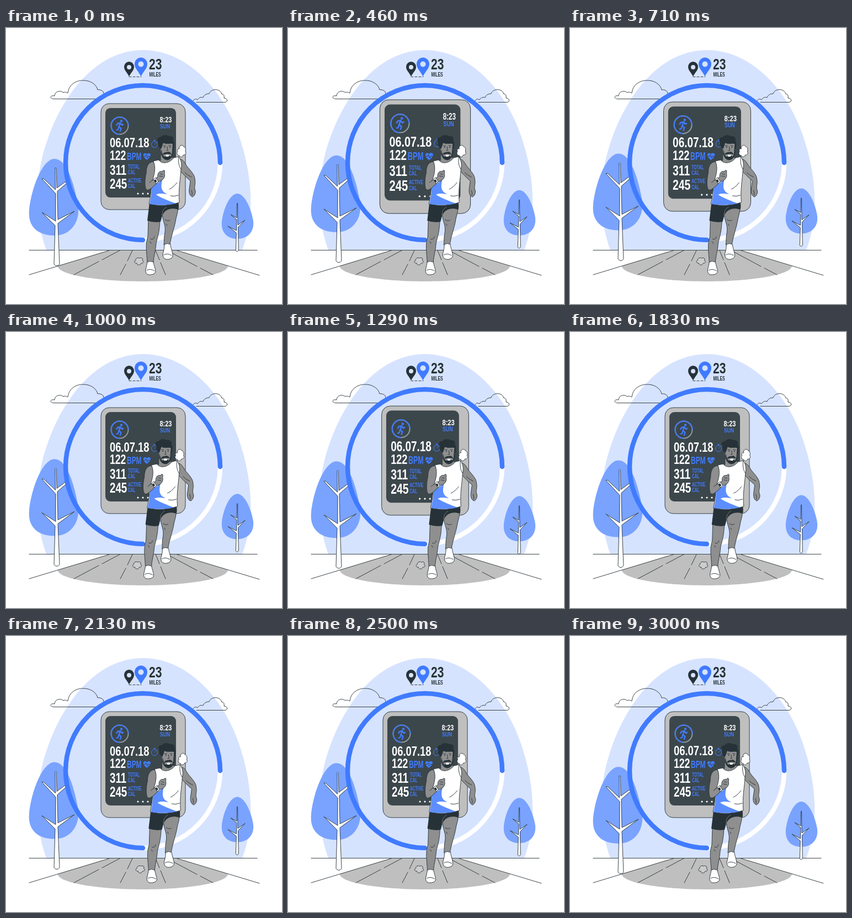
Animation of 500x500 px, one loop 3040 ms. Source, as an HTML page:

```html
<!DOCTYPE html>
<html lang="en">
<head>
<meta charset="utf-8">
<title>Running tracker</title>
<style>
  html, body { margin: 0; width: 100%; height: 100%; overflow: hidden; background: #fff; }
  svg { display: block; width: 100%; height: 100%; }
  text { font: bold 10px "Liberation Sans", Arial, sans-serif; }
  .line { fill: none; stroke: #263238; stroke-width: .9; stroke-linecap: round; stroke-linejoin: round; }
  .ink { stroke: #263238; stroke-width: .9; stroke-linejoin: round; }
  .dark { fill: #263238; }
  .blue { fill: #407bff; }
  .white { fill: #fff; }
  .skin { fill: #8f8f8f; }
  .grey { fill: #bfbfbf; }
  .leaf { fill: #79a3ff; }
  .pale { fill: #d6e3ff; }
</style>
</head>
<body>
<svg viewBox="0 0 500 500">
  <path class="pale" d="M73 402C50 340 52 265 76 200C105 118 165 40 248 40C330 40 395 115 422 195C446 265 452 340 428 402Z"/>

  <!-- clouds -->
  <path class="line" d="M165 128.5H87C79 129 79 121 88 123C88 115 98 112 104 117C107 115 110 117 112 118C114 100 130 95 138 95C152 94 164 102 166 112C173 111 178 115 177 121"/>
  <path class="line" d="M345 134.5H397C403 133 401 127 395 127C396 121 393 119 391 120C389 109 371 109 368 119C360 119 358 124 357 126C352 124 348 128 347 130C342 127 340 130 339 132"/>

  <!-- distance marker -->
  <path class="dark" d="M223 88C220 81 214 77 214 70.500A9 9.500 0 0 1 232 70.500C232 77 226 81 223 88Z"/>
  <path class="blue" d="M244.500 88C241 79 233 74 233 65.500A11.500 12 0 0 1 256 65.500C256 74 248 79 244.500 88Z"/>
  <circle class="pale" cx="223" cy="71" r="4"/>
  <circle class="pale" cx="244.500" cy="65.500" r="5"/>
  <path class="line" stroke-dasharray="4 3" d="M223 88.500H245"/>
  <g id="marker"></g>

  <!-- road -->
  <path class="grey" d="M187 403H310L402 431C402 447 330 459 248 459S93 447 94 431Z"/>
  <path class="line" d="M42 402.500H455M42 447L187 403M459 448L310 403"/>
  <path class="line" d="M123 447L168 423M174 420L206 403M207 447L217 428M220 422L229 403M289 447L280 425M278 420L271 403M375 447L352 435M346 432L292 403"/>

  <g class="tree">
    <path class="leaf" d="M88 237C108 237 122 275 130 318C136 350 118 376 88 376C58 376 39 360 42 330C46 290 66 237 88 237Z"/>
    <path class="white ink" d="M89 254Q90 252 91 254L92 290L107 279L110 281L93 296L94 347L124 332L94 354L97 428Q92 434 87 428L89 358L65 334L90 350L90 300L65 273L68 273L89.500 293Z"/>
  </g>
  <g class="tree">
    <path class="leaf" d="M419 300C432 300 444 326 448 350C450 370 437 382 419 382C400 382 389 370 391 350C394 326 406 300 419 300Z"/>
    <path class="white ink" d="M418.400 318Q419 316 419.600 318L420 357L433 348L420.500 361L421.300 403Q418.500 407 416.300 403L417.300 371L402 359L417.500 367L418 347L407 338L418.200 344Z"/>
  </g>

  <!-- progress ring -->
  <g fill="none" stroke-width="8.500" stroke-linecap="round">
    <path stroke="#fff" d="M388 244A140 140 0 0 1 248 384"/>
    <path stroke="#407bff" d="M248 384A140 140 0 1 1 388 244"/>
  </g>

  <g id="watch">
    <rect class="grey ink" x="172" y="137" width="153" height="192" rx="15"/>
    <rect x="180" y="145" width="128" height="162" rx="9" fill="#3c474c"/>
    <g fill="none" stroke-width="2">
      <circle cx="206" cy="177" r="15.500" stroke="#8f999e"/>
      <path stroke="#407bff" d="M206 192.500A15.500 15.500 0 1 1 221.500 177"/>
    </g>
    <circle class="blue" cx="209" cy="168.500" r="2.200"/>
    <path fill="none" stroke="#407bff" stroke-width="2.300" stroke-linejoin="round" d="M207 172L204.500 179L208.500 182L206.500 188M204.500 179L203 184L199.500 185M200 177L202 173L207 172L210 176L213 174"/>
    <g fill="none" stroke="#407bff">
      <circle cx="269" cy="211" r="5.500"/>
      <path d="M267 203.500H271M269 203.500V205.500M269 211L271.500 208.500M273.500 205.500L275 207"/>
    </g>
    <path class="blue" d="M255 239C250 235 248 232 249 229C250 226 254 226 255 229C256 226 261 226 262 229C262 233 259 236 255 239Z"/>
    <path fill="none" stroke="#3c474c" d="M248 232.500H252L254 230L256 235L258 232.500H263"/>
    <g class="white"><circle cx="239" cy="300" r="1.600"/><circle cx="248" cy="300" r="1.600"/><circle cx="257" cy="300" r="1.600"/></g>
  </g>

  <g id="runner">
    <!-- breath and dust -->
    <path class="white ink" d="M314 219C312 213 320 210 322 215C326 216 326 222 325 224C328 228 323 231 321 230C320 235 314 234 314 231C309 231 309 225 311 224C309 221 311 218 314 219Z"/>
    <path class="ink" fill="#ccc" d="M235 421C234 417 240 415 242 417C246 415 249 418 247 421C251 423 248 427 245 426C243 431 237 430 237 426C233 427 231 422 235 421Z"/>

    <!-- legs -->
    <path class="skin ink" d="M258 346L279 347C278 372 274 380 272 390C271 405 267 415 267 426H256C255 405 252 392 257 378Z"/>
    <path class="white ink" d="M256 424Q261 421 267 424C268 430 271 436 271 442Q268 448 258 447Q252 445 253 438Q255 430 256 424Z"/>
    <path class="skin ink" d="M283 334C283 350 290 356 288 370C286 378 287 385 286 393H297C298 380 306 360 308 345Q311 335 312 326L290 326Z"/>
    <path class="white ink" d="M287 392Q292 389 298 392C298 398 303 408 302 414Q299 420 290 419Q284 417 284 410Q287 400 287 392Z"/>
    <path class="line" d="M288 347Q293 351 297 348M290 355L292 358M262 382Q267 385 269 378M261 387L263 390M255 439Q261 435 269 440M286 411Q292 407 300 412"/>
    <path class="dark" d="M260 316L312 314Q314 324 312 329C300 325 288 328 283 340L280 351Q268 353 256 349Z"/>
    <path d="M283 340Q282 329 291 324" fill="none" stroke="#8f8f8f" stroke-width=".7"/>

    <!-- far arm -->
    <path class="skin ink" d="M311 237C322 236 324 246 329 252C336 260 342 267 342 273C344 282 341 285 342 292C345 297 342 304 338 306C334 305 331 300 332 292L334 277C327 271 320 264 315 258Z"/>
    <path class="line" d="M324 262Q329 267 336 270M336 294Q338 298 337 303"/>

    <!-- neck and shirt -->
    <path class="skin ink" d="M280 229L280 240L270 244L286 254L312 239L300 234V225Z"/>
    <path class="white ink" d="M267 241L277 239C281 246 294 247 304 235L313 233C318 240 319 248 317 256C316 276 312 290 314 316Q288 325 259 319C263 300 264 284 264 272C268 260 270 252 267 241Z"/>
    <path class="blue" opacity=".85" d="M264 279C270 286 277 281 284 272C279 290 282 296 292 301C282 300 277 299 272 302C283 309 295 313 308 318Q286 323 260 319C264 302 264 290 264 279Z"/>
    <path class="line" d="M313 233C312 243 313 250 317 256M310 280Q303 289 296 292M312 303Q304 306 298 304"/>

    <!-- near arm -->
    <path class="skin ink" d="M267 242C257 243 254 252 254 263C251 275 251 291 255 293C260 296 269 284 277 278C285 276 289 270 287 263C289 258 285 255 284 260C277 258 274 264 275 270L265 276C269 266 272 252 267 242Z"/>
    <path class="line" d="M265 276L260 280M279 264L284 265M278 268L284 269"/>
    <path class="white ink" d="M267 274L271 271L276 278L272 282Z"/>
    <path class="dark" d="M268 276L271 274L273.500 278L271 280Z"/>

    <!-- head -->
    <path class="skin ink" d="M279 209Q290 203 303 209C305 222 303 236 293 239C283 239 279 228 279 209Z"/>
    <path class="dark" d="M281 219C275 215 274 208 276 207C272 204 274 197 280 198C283 193 291 193 295 196C302 195 305 200 303 204C307 208 304 215 303 221C303 232 299 239 292 239C284 239 281 230 281 219L283 226C284 231 286 233 288 233C291 230 295 230 298 233Q301 230 301 222L302 210C297 208 291 212 285 208Q283 214 281 219Z"/>
    <path class="dark" d="M284 230C285 224 291 225 292 225C295 223 299 226 300 229C296 228 294 228 292 228C289 228 287 229 284 230Z"/>
    <path class="white" d="M289 230.500Q292 229 296 230.500L294 233H290Z"/>
    <path class="line" d="M285 213.500L289 213M295 213L299 213.500M292 215L293 222H290.500"/>
    <circle class="dark" cx="287.500" cy="216" r="1"/><circle class="dark" cx="297" cy="216" r="1"/>
  </g>
</svg>
<script>
const LOOP = 3040;
const DIGITS = .75, LETTERS = .63; // condensed faces
const $ = id => document.getElementById(id);

function label(group, str, x, y, size, color, narrow) {
  const el = document.createElementNS('http://www.w3.org/2000/svg', 'text');
  el.textContent = str;
  el.setAttribute('transform', `translate(${x} ${y}) scale(${narrow} 1)`);
  el.setAttribute('fill', color);
  el.style.fontSize = size + 'px';
  $(group).append(el);
}
const INK = '#263238', BLUE = '#407bff';
label('marker', '23', 259, 75, 28, INK, DIGITS);
label('marker', 'MILES', 259.5, 88, 11, INK, LETTERS);
label('watch', '8:23', 278.5, 171, 14.5, '#fff', DIGITS);
label('watch', 'SUN', 279, 182, 11.5, BLUE, DIGITS);
label('watch', '06.07.18', 188, 216.5, 24.5, '#fff', DIGITS);
label('watch', '122', 188, 239, 23.5, '#fff', DIGITS);
label('watch', 'BPM', 219, 239, 19, BLUE, LETTERS);
label('watch', '311', 188, 266, 25, '#fff', DIGITS);
label('watch', 'TOTAL', 221, 255, 10.5, BLUE, LETTERS);
label('watch', 'CAL', 221, 265, 10.5, BLUE, LETTERS);
label('watch', '245', 188, 291, 25, '#fff', DIGITS);
label('watch', 'ACTIVE', 221, 280, 10.5, BLUE, LETTERS);
label('watch', 'CAL', 221, 290, 10.5, BLUE, LETTERS);

// cubic-bezier(.36, .07, .19, .97), solved by bisection
function ease(x) {
  const curve = (s, a, b) => 3 * (1 - s) ** 2 * s * a + 3 * (1 - s) * s * s * b + s ** 3;
  let lo = 0, hi = 1;
  for (let i = 0; i < 20; i++) {
    const mid = (lo + hi) / 2;
    if (curve(mid, .36, .19) < x) lo = mid; else hi = mid;
  }
  return curve(lo, .07, .97);
}

function tween(p, keys, timing = x => x) {
  const i = keys.findIndex(k => k[0] > p);
  const [p0, v0] = keys[i - 1], [p1, v1] = keys[i];
  return v0 + (v1 - v0) * timing((p - p0) / (p1 - p0));
}

const BEAT = [[0, 1], [.1, 1.1], [.3, 1], [.4, 1], [.5, 1.1], [.6, 1], [1, 1]];
const SHAKE = [0, -1, 2, -4, 4, -4, 4, -4, 2, -1, 0].map((v, i) => [i / 10, v]);
const trees = document.querySelectorAll('.tree');

function draw() {
  const t = performance.now() % LOOP;
  const half = t % 1500 / 1500;
  const scale = tween(t % 3000 / 3000, BEAT);
  const lift = -10 * (1 - Math.abs(1 - 2 * half));
  $('watch').setAttribute('transform', `translate(248.5 233) scale(${scale}) translate(-248.5 -233)`);
  $('runner').setAttribute('transform', `translate(${tween(half, SHAKE, ease)} 0)`);
  trees.forEach(tree => tree.setAttribute('transform', `translate(0 ${lift})`));
  requestAnimationFrame(draw);
}
draw();
</script>
</body>
</html>
```
